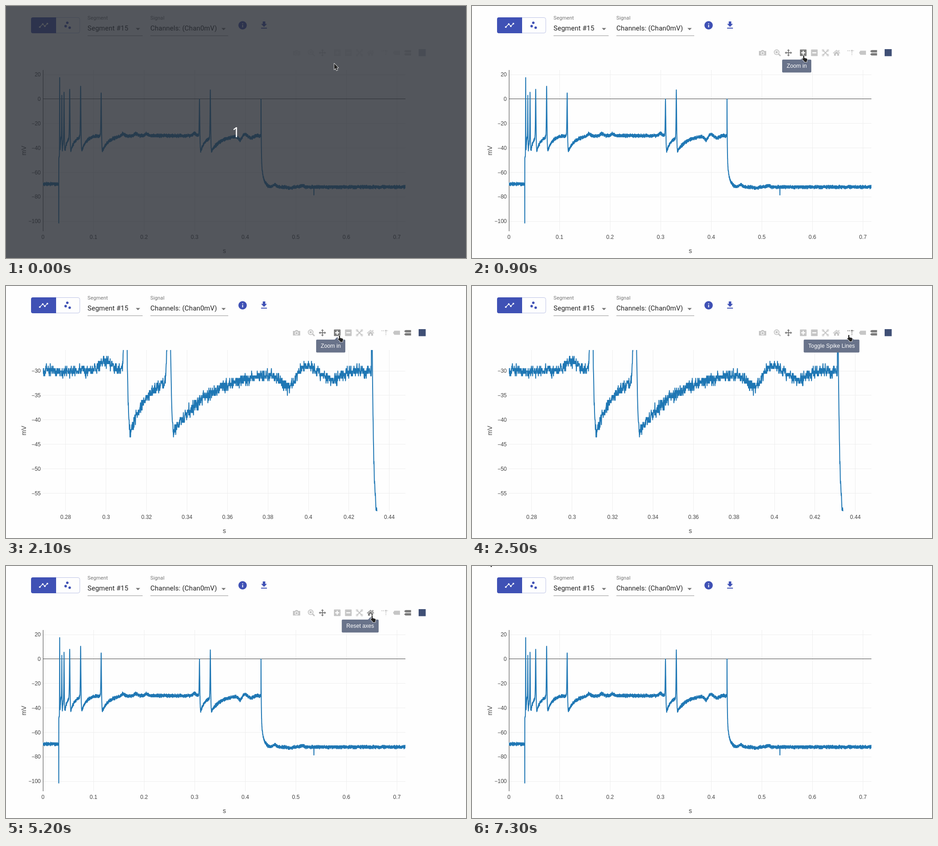
Write an HTML page that moves like this. It is 1010x555 px and loops after 8 s.

```html
<!DOCTYPE html>
<html lang="en">
<head>
<meta charset="utf-8">
<title>Membrane potential viewer</title>
<style>
  html, body { margin: 0; width: 100%; height: 100%; overflow: hidden; background: #fefefe; }
  svg { display: block; }
  .form { font-family: Roboto, sans-serif; font-size: 14.8px; letter-spacing: .00938em; fill: #212121; }
  .form .label { font-size: 11px; fill: #757575; }
  .plot { font-family: "Liberation Sans", Arial, sans-serif; font-size: 12px; fill: #444; }
  .plot .title { font-size: 14px; text-anchor: middle; }
  .grid { stroke: #eee; }
  .zero { stroke: #444; }
  .trace { fill: none; stroke: #1f77b4; stroke-width: 2; stroke-linejoin: round; }
  .icon { opacity: .3; color: #444; fill: currentColor; }
  .icon.on { opacity: .7; }
  .icon .hole { fill: #fefefe; }
  .icon .line { fill: none; stroke: currentColor; stroke-width: 1.8; }
  .tip { font: 12.2px "Liberation Sans", Arial, sans-serif; }
  .tip rect, .tip path { fill: #69738a; }
  .tip text { fill: #fff; text-anchor: end; }
  .pointer { fill: #222; stroke: #fff; stroke-width: 1.6; stroke-linejoin: round; paint-order: stroke; }
  #countdown { font: 500 31px "Noto Sans", sans-serif; text-anchor: middle; }
</style>
</head>
<body>
<svg id="stage" width="1010" height="555" viewBox="0 0 1010 555">
  <defs><clipPath id="area"><rect x="81" y="141" width="796" height="355"/></clipPath></defs>
  <rect width="1010" height="555" fill="#fefefe"/>

  <g class="form">
    <path d="M110 25H59a4 4 0 0 0-4 4v27a4 4 0 0 0 4 4h51z" fill="#3f51b5"/>
    <path d="M110 25.5h48a4 4 0 0 1 4 4v26a4 4 0 0 1-4 4h-48" fill="none" stroke="#bcc3e6"/>
    <g transform="translate(71.5 31.5) scale(.92)" fill="#fff">
      <path d="M3 16l7-7 5 5 6-6" fill="none" stroke="#fff" stroke-width="1.5"/>
      <circle cx="3" cy="16" r="2"/><circle cx="10" cy="9" r="2"/>
      <circle cx="15" cy="14" r="2"/><circle cx="21" cy="8" r="2"/>
    </g>
    <g transform="translate(124.5 31.5) scale(.92)" fill="#3f51b5">
      <circle cx="7" cy="14" r="3"/><circle cx="11" cy="6" r="3"/><circle cx="16.6" cy="17.6" r="3"/>
    </g>
    <text class="label" x="179" y="30">Segment</text>
    <text x="179" y="54">Segment #15</text>
    <text class="label" x="317" y="30">Signal</text>
    <text x="317" y="54">Channels: (Chan0mV)</text>
    <path d="M179 65.5h121M317 65.5h171" stroke="#949494"/>
    <path d="M285 48.5h9.5l-4.75 4.7zM473 48.5h9.5l-4.75 4.7z" fill="#757575"/>
    <g fill="#3f51b5">
      <circle cx="519.5" cy="42.5" r="9.2"/>
      <path d="M518.6 37.9h1.9v1.9h-1.9zM518.6 41.6h1.9v5.5h-1.9z" fill="#fff"/>
      <path transform="translate(555.5 31.3) scale(.92)" d="M19 9h-4V3H9v6H5l7 7zM5 18v2h14v-2z"/>
    </g>
  </g>

  <g class="plot">
    <g id="views"></g>
    <text class="title" x="479.5" y="544">s</text>
    <text class="title" transform="translate(44 318.5) rotate(-90)">mV</text>
  </g>

  <g id="toolbar"><rect x="906" y="95" width="15.5" height="15.5" fill="#3f4f75"/></g>
  <g id="tips"></g>

  <g id="countdown">
    <rect width="1010" height="555" fill="#282c34" opacity=".8"/>
    <text x="505" y="289" fill="#fff">1</text>
  </g>

  <path id="arrow" class="pointer" d="M0 0V13.5l3-2.9 2.1 4.9 2.3-1-2.1-4.7h4.1z"/>
  <path id="hand" class="pointer" d="M-1.4.6Q-.2-.6 1 .6V5.300l5.200 1.400q1.700.5 1.500 2.200l-.9 3.600v1.800H1.100v-1.800L-3.400 8.500q-.6-1.800.9-1.800l1.100.9z"/>
</svg>

<script>
const LOOP = 8000, TICK = 100;
const byId = id => document.getElementById(id);
const clamp = v => Math.max(0, Math.min(1, v));

function add(parent, tag, attrs = {}, text = "") {
  const node = document.createElementNS("http://www.w3.org/2000/svg", tag);
  for (const key in attrs) node.setAttribute(key, attrs[key]);
  node.textContent = text;
  parent.append(node);
  return node;
}
const show = (node, on) => node.setAttribute("visibility", on ? "visible" : "hidden");

// Neuron model, in ms and mV: a current step with spikes that reset and recover
const STEP_ON = 31.4, STEP_OFF = 431.2, REST = -69.5, PLATEAU = -30, RESET = -42.7;
const spikes = [ // time, peak, recovery time constant
  [33.2, 16.7, 1], [37.4, 3.3, 2], [41.8, 5.2, 5], [53, 8.9, 8], [74.6, 10.4, 9],
  [115.2, 5.2, 13], [309.6, 0, 10], [331, 7.4, 18]
];
const swells = [ // time, height
  [158, 2], [184, 1.7], [205, 1.5], [300, 1.8], [390, -2.800], [398, 1.6], [412, -1.800],
  [459, 1.7], [489, -1], [512, 1.2]
];
const spikeShape = x => Math.exp(-(Math.abs(x) ** 1.5));

function baseline(ms) {
  if (ms < STEP_ON) return REST;
  if (ms >= STEP_OFF) {
    const dt = ms - STEP_OFF;
    return -72 + 22 * Math.exp(-dt / 4.5) + 50 * Math.exp(-dt / .55);
  }
  const last = spikes.findLast(([at]) => ms >= at);
  if (!last) return -48;
  const [at, , tau] = last;
  const delay = 2.2 * spikeWidth(tau);
  return PLATEAU + (RESET - PLATEAU) * Math.exp(-Math.max(0, ms - at - delay) / tau);
}
const spikeWidth = tau => Math.min(1, .3 + tau / 12);

function potential(ms) {
  let v = baseline(ms);
  for (const [at, height] of swells) v += height * Math.exp(-(((ms - at) / 5) ** 2));
  for (const [at, peak, tau] of spikes) {
    const width = spikeWidth(tau) * (ms < at ? .7 : .85);
    if (Math.abs(ms - at) < 4) v += (peak - v) * spikeShape((ms - at) / width);
  }
  return v;
}

function record() {
  const samples = [];
  let seed = 15;
  const random = () => (seed = (seed * 16807) % 2147483647) / 2147483647;
  for (let i = 0; i <= 7168; i++) {
    const noise = (random() + random() + random() - 1.5) * 1.2;
    samples.push([i / 10000, Math.round((potential(i / 10) + noise) * 2) / 2]);
  }
  // Stimulus artefacts
  samples[314][1] = -101.5;
  samples[5358][1] = -78.5;
  return samples;
}

const CENTER = { x: 479, y: 318.5, s: .35835, mV: -42.2 };
const samples = record();

function buildView(zoom, stepX, stepY) {
  const view = add(byId("views"), "g");
  const px = s => CENTER.x + (s - CENTER.s) * zoom * 796 / .7167;
  const py = mV => CENTER.y - (mV - CENTER.mV) * zoom * 355 / 131.9;
  const crisp = p => Math.floor(p + .01) + .5;
  const ticks = (mid, half, step) => {
    const list = [];
    for (let n = Math.ceil((mid - half) / step - .01); n * step <= mid + half; n++) list.push(+(n * step).toFixed(2));
    return list;
  };
  const label = v => String(v).replace("-", "\u2212");
  const rules = [];
  for (const s of ticks(CENTER.s, .35835 / zoom, stepX)) {
    rules.push([s, `M${crisp(px(s))} 141V496`]);
    add(view, "text", { x: px(s), y: 513, "text-anchor": "middle" }, label(s));
  }
  for (const mV of ticks(CENTER.mV, 65.9 / zoom, stepY)) {
    rules.push([mV, `M81 ${crisp(py(mV))}H877`]);
    add(view, "text", { x: 76.3, y: py(mV) + 4.2, "text-anchor": "end" }, label(mV));
  }
  rules.sort((a, b) => (a[0] === 0) - (b[0] === 0));
  for (const [value, d] of rules) add(view, "path", { d, class: value ? "grid" : "zero" });
  const points = samples
    .filter(([s]) => Math.abs(px(s) - CENTER.x) < 402)
    .map(([s, mV]) => px(s).toFixed(2) + "," + py(mV).toFixed(2)).join(" ");
  add(view, "polyline", { points, class: "trace", "clip-path": "url(#area)" });
  return view;
}
const views = [buildView(1, .1, 20), buildView(2, .05, 10), buildView(4, .02, 5)];

// Toolbar: icons are drawn around their own centre
const square = '<rect x="-7.2" y="-7.2" width="14.5" height="14.5" rx="1"/>';
const around = d => [0, 90, 180, 270].map(a => `<path transform="rotate(${a})" d="${d}"/>`).join("");
const tag = (y, h) => `<path d="M-7.5 ${y + h / 2}l3-${h / 2}H7.8v${h}H-4.5z"/>`;
const groups = [
  [["Download plot as a png", '<path d="M-8-4h4.500l1.500-2h4l1.500 2H8V6H-8z"/><circle class="hole" cy="1" r="3.8"/><circle cy="1" r="2.5"/>']],
  [["Zoom", '<circle class="line" cx="-1.5" cy="-1.2" r="5.3"/><path d="M-3.8-3.5H.8V1.100h-4.600zM1.500 3.500l2-2L8 6 6 8z"/>'],
   ["Pan", '<path class="line" d="M-6 0H6M0-6V6"/>' + around("M0-8l3 3.5h-6z"), true]],
  [["Zoom in", square + '<path class="hole" d="M-4.5-1.2h9v2.4h-9zM-1.2-4.5h2.4v9h-2.400z"/>'],
   ["Zoom out", square + '<path class="hole" d="M-4.5-1.2h9v2.4h-9z"/>'],
   ["Autoscale", '<path class="line" d="M-4-4L4 4M4-4L-4 4"/>' + around("M-5.8-5.8h4l-4 4zM-7.5-7.5H-3v1h-3.500v3.500h-1z")],
   ["Reset axes", '<path d="M0-6.5L8 .6l-1 1.100L0-4.500-7 1.700-8 .6zM4-6h2v4L4-3.800z"/><path d="M0-3.200l5.500 4.900v4.800h-4v-4h-3v4h-4V1.700z"/>']],
  [["Toggle Spike Lines", '<path class="line" d="M-8.300-4.500H-.8M1.400-1.500v8" stroke-dasharray="2 1.8"/><circle cx="1.4" cy="-4.5" r="1.9"/><path d="M4.200-5.300h1.500v1.600h-1.500z"/>'],
   ["Show closest data on hover", tag(-4.5, 9)],
   ["Compare data on hover", tag(-6, 5.2) + tag(.8, 5.2), true]]
];
const ICON_STEP = 24.4, GROUP_GAP = 8;

function buildButton(x, [name, art, active]) {
  const icon = add(byId("toolbar"), "g", { transform: `translate(${x} 103)` });
  icon.innerHTML = art;
  const tip = add(byId("tips"), "g", { visibility: "hidden", class: "tip" });
  const text = add(tip, "text", { x: x + 7.8, y: 136.3 }, name);
  const width = text.getComputedTextLength() + 20;
  tip.prepend(add(tip, "rect", { x: x + 17.8 - width, y: 118, width, height: 28.5, rx: 2 }));
  add(tip, "path", { d: `M${x - 6} 118.5l6-6 6 6z` });
  return { x, icon, tip, active };
}
let nextX = 638;
const buttons = groups.flatMap((group, i) => {
  const built = group.map(spec => {
    const button = buildButton(nextX, spec);
    nextX += ICON_STEP;
    return button;
  });
  // The spike-line switch stands in a group of its own size
  nextX += i < 3 ? GROUP_GAP : 0;
  return built;
});

// Pointer moves, each eased: start ms, end ms, to x, to y
const moves = [
  [100, 600, 726, 112.5], [700, 900, 728.5, 109], [1300, 1400, 731, 109],
  [2050, 2400, 855, 105], [2400, 2600, 800, 110.5], [3000, 3200, 804, 109.5],
  [5700, 5800, 800.5, 109], [6000, 6900, 41, 4], [6900, 7300, 36.5, -13]
];
const ease = u => u < .5 ? 4 * u ** 3 : 1 - 4 * (1 - u) ** 3;

function pointerAt(t) {
  let x = 720.5, y = 126.5;
  for (const [from, to, toX, toY] of moves) {
    const u = ease(clamp((t - from) / (to - from)));
    x += (toX - x) * u;
    y += (toY - y) * u;
  }
  return [x, y];
}

function render(t) {
  const [x, y] = pointerAt(t);
  const zoomed = t < 1100 || t >= 5200 ? 0 : t < 1600 ? 1 : 2;
  views.forEach((view, i) => show(view, i === zoomed));
  show(byId("countdown"), t < 100);
  byId("toolbar").setAttribute("opacity", clamp(Math.min(.6 + (t - 100) / 300, (6600 - t) / 300)));

  let clickable = false;
  for (const { x: center, icon, tip, active } of buttons) {
    const over = Math.abs(x - center) < ICON_STEP / 2 && y > 94 && y < 114;
    clickable ||= over;
    show(tip, over);
    icon.setAttribute("class", over || active ? "icon on" : "icon");
  }
  for (const id of ["arrow", "hand"]) {
    byId(id).setAttribute("transform", `translate(${x} ${y})`);
    show(byId(id), clickable === (id === "hand"));
  }
}

const start = performance.now();
function frame() {
  const t = (performance.now() - start) % LOOP;
  render(Math.floor(t / TICK) * TICK);
  requestAnimationFrame(frame);
}
frame();
</script>
</body>
</html>
```
